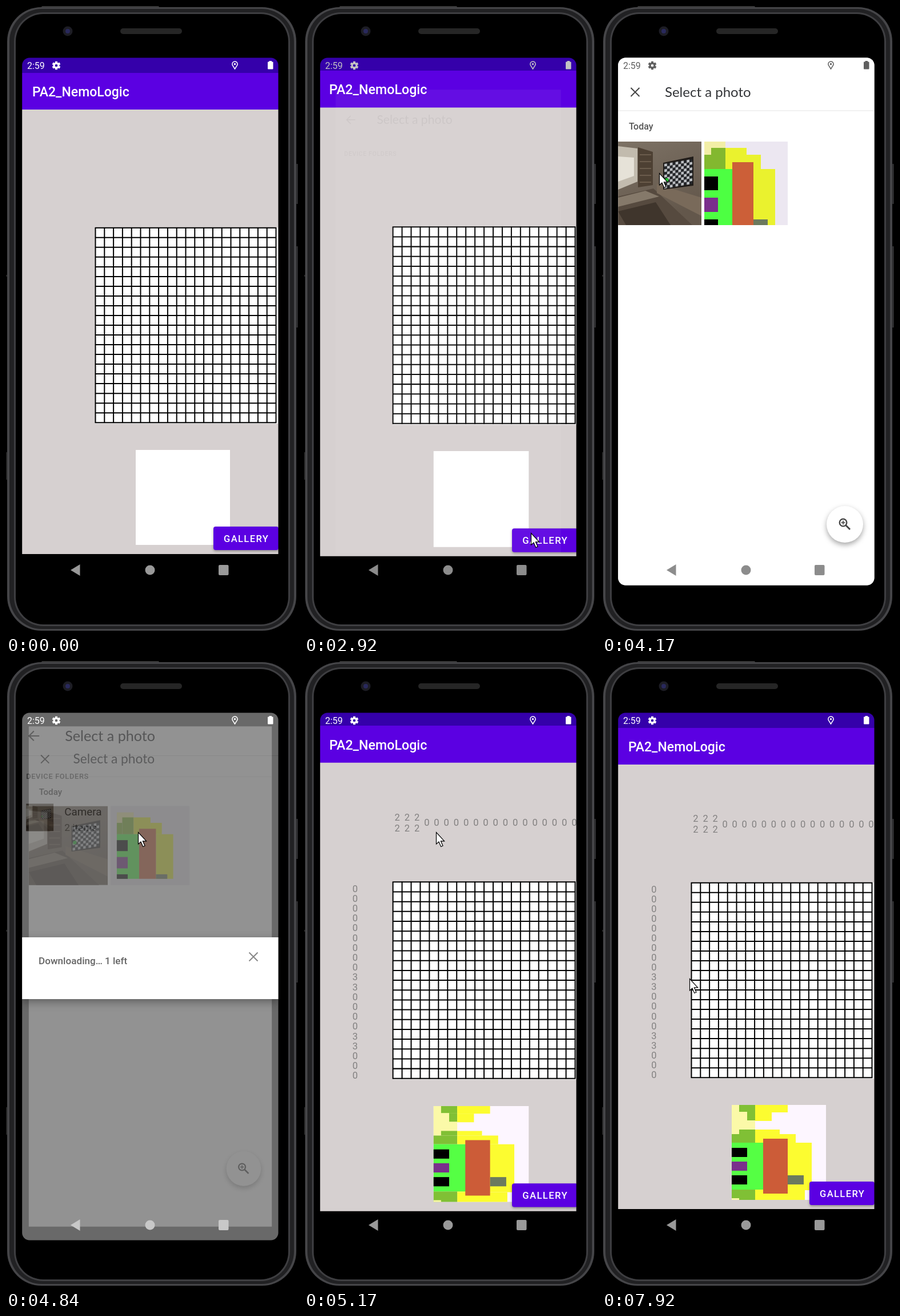
An HTML page with a canvas for the animation above (8000 ms loop, 511 by 1096 pixels).

```html
<!DOCTYPE html>
<html lang="en">
<head>
<meta charset="utf-8">
<title>Photo picker</title>
<style>
html, body { margin: 0; width: 100%; height: 100%; overflow: hidden; background: #000; }
canvas { display: block; }
</style>
</head>
<body>
<canvas id="stage" width="511" height="1096"></canvas>
<script>
const main = document.getElementById('stage').getContext('2d');
const buffer = main.canvas.cloneNode().getContext('2d');
let c = main;
const LOOP = 8000, FPS = 12, CX = 252.5, CY = 551.5;
const OPEN_LIST = 2864, OPEN_GRID = 3640, PICK = 4590, CLOSE_GRID = 4761, CLOSE_LIST = 5009;
const PALE = '#fbf9a8', OLIVE = '#80c035', YELLOW = '#fcfc30', GREEN = '#55ff44',
  ORANGE = '#cc5c38', PURPLE = '#7a2f8c', GREY = '#6c7a5e';
const CURSOR = [
  [980, 470, 101], [1250, 470, 101], [2000, 432, 924], [2240, 397, 921], [2920, 397, 921],
  [3480, 100, 292], [4230, 100, 292], [4480, 231, 299], [5900, 231, 299], [6480, 163, 527],
  [6740, 163, 527], [6900, 150, 591], [7080, 150, 591], [7400, 153, 555]
];

const clamp = v => Math.max(0, Math.min(1, v));
const ramp = (t, start, length) => clamp((t - start) / length);
const bez = (a, b, d, e, s) => {
  const r = 1 - s;
  return r * r * r * a + 3 * r * r * s * b + 3 * r * s * s * d + s * s * s * e;
};

// Two-part curve: quick start, very slow end.
function ease(x) {
  const [px, py] = x < 1 / 6
    ? [[0, .05, .1333, .1667], [0, 0, .06, .4]]
    : [[.1667, .2083, .25, 1], [.4, .82, 1, 1]];
  let lo = 0, hi = 1;
  for (let i = 0; i < 20; i++) {
    const mid = (lo + hi) / 2;
    if (bez(...px, mid) < x) lo = mid; else hi = mid;
  }
  return bez(...py, lo);
}
const move = (t, start) => ease(ramp(t, start, 400));

function rect(color, x, y, w, h, r = 0) {
  c.fillStyle = color;
  c.beginPath();
  c.roundRect(x, y, w, h, r);
  c.fill();
}
function disc(color, x, y, r) {
  c.fillStyle = color;
  c.beginPath();
  c.arc(x, y, r, 0, 7);
  c.fill();
}
function poly(color, ...p) {
  c.fillStyle = color;
  c.beginPath();
  for (let i = 0; i < p.length; i += 2) c.lineTo(p[i], p[i + 1]);
  c.closePath();
  c.fill();
}
function lines(color, width, ...paths) {
  c.strokeStyle = color;
  c.lineWidth = width;
  c.beginPath();
  for (const [x, y, ...rest] of paths) {
    c.moveTo(x, y);
    for (let i = 0; i < rest.length; i += 2) c.lineTo(rest[i], rest[i + 1]);
  }
  c.stroke();
}
// y is the middle of the capitals
function text(str, x, y, size, color, { weight = 400, family = 'Roboto', gap = 0, align = 'left' } = {}) {
  c.font = `${weight} ${size}px ${family}, sans-serif`;
  c.letterSpacing = gap + 'px';
  c.textAlign = align;
  c.fillStyle = color;
  c.fillText(str, x, y + size * .355);
}
function shadow(blur, dy, draw) {
  c.save();
  c.shadowColor = 'rgba(0,0,0,.35)';
  c.shadowBlur = blur;
  c.shadowOffsetY = dy;
  draw();
  c.restore();
}
function scaled(scale, x, y, draw) {
  c.save();
  c.translate(x, y);
  c.scale(scale, scale);
  c.translate(-x, -y);
  draw();
  c.restore();
}
// Paints a window aside, then blends it in as one picture
function layer(scale, alpha, draw) {
  if (alpha <= 0) return;
  c = buffer;
  c.clearRect(0, 0, 511, 1096);
  scaled(scale, CX, CY, draw);
  c = main;
  c.globalAlpha = alpha;
  c.drawImage(buffer.canvas, 0, 0);
  c.globalAlpha = 1;
}
const cross = (x, y, r, color) =>
  lines(color, 2, [x - r, y - r, x + r, y + r], [x + r, y - r, x - r, y + r]);

function phone() {
  rect('#000', 0, 0, 511, 1096);
  rect('#333', 62, 0, 206, 4, 2);
  for (const [y, h] of [[276, 70], [420, 142]]) rect('#29292b', 505, y, 7, h, 2);
  for (const [y, h] of [[470, 3], [780, 48]]) rect('#222', 0, y, 3, h);
  rect('#454548', 2, 2, 506, 1090, 60);
  rect('#212123', 6, 5, 498, 1084, 57);
  rect('#3e3e41', 14, 11, 483, 1073, 51);
  rect('#000', 17, 14, 477, 1067, 48);
  disc('#1d1d24', 108, 44, 8.5);
  disc('#29295c', 108, 44, 4);
  rect('#262626', 200, 39, 108, 10, 5);
}

function pixelArt() {
  rect('#fdf6ff', 227, 776, 165, 166);
  rect(PALE, 227, 776, 41, 51);
  rect(OLIVE, 240, 776, 28, 12);
  rect(OLIVE, 254, 788, 14, 15);
  rect(OLIVE, 240, 819, 28, 8);
  rect(OLIVE, 227, 827, 41, 15);
  rect(YELLOW, 268, 776, 57, 13);
  rect(YELLOW, 268, 789, 29, 15);
  rect(YELLOW, 268, 819, 43, 8);
  rect(YELLOW, 268, 827, 71, 15);
  rect(YELLOW, 268, 842, 99, 83);
  rect(YELLOW, 268, 925, 87, 17);
  rect(GREEN, 227, 842, 56, 82);
  rect(OLIVE, 227, 924, 41, 18);
  rect(PALE, 227, 939, 13, 3);
  rect(ORANGE, 282, 835, 43, 96);
  rect('#000', 227, 851, 27, 16);
  rect(PURPLE, 227, 875, 27, 16);
  rect('#000', 227, 899, 27, 16);
  rect(GREY, 325, 899, 28, 16);
}

function home(solved) {
  rect('#000', 28, 90, 449, 923);
  rect('#d6d0d0', 28, 90, 449, 868);
  rect('#5b00e2', 28, 117, 449, 64);
  rect('#3500aa', 28, 90, 449, 27);
  text('PA2_NemoLogic', 46, 150, 23, '#fff', { weight: 500 });

  rect('#fff', 156, 387, 320, 343);
  for (let i = 0; i <= 20; i++) {
    const x = 156.5 + i * 15.8, y = 387.8 + i * 17.02;
    lines('#000', 2, [x, 387, x, 729], [156, y, 473, y]);
  }

  if (solved) {
    const style = { align: 'center' }, ink = '#828080';
    for (let i = 0; i < 20; i++) {
      const x = 164 + i * 17.05;
      if (i < 3) {
        text('2', x, 275.5, 16.5, ink, style);
        text('2', x, 294.5, 16.5, ink, style);
      } else text('0', x, 285, 16.5, ink, style);
      const three = [9, 10, 15, 16].includes(i);
      text(three ? '3' : '0', 91, 399 + i * 17.05, 16.5, ink, style);
    }
    pixelArt();
  } else rect('#fff', 227, 776, 165, 166);

  shadow(4, 2, () => rect('#5b00e2', 363, 910, 114, 41, 4));
  text('GALLERY', 381, 931, 16.5, '#fff', { weight: 500, gap: 1.4 });
}

function header() {
  rect('#fff', 28, 90, 449, 923);
  lines('#e3e3e3', 1, [28, 183, 477, 183]);
  text('Select a photo', 110, 150, 24, '#333538', { family: 'Lato' });
}

// Living room in a 146 px square
function room(x, y, scale) {
  c.save();
  c.translate(x, y);
  c.scale(scale, scale);
  c.beginPath();
  c.rect(0, 0, 146, 146);
  c.clip();
  const wall = c.createLinearGradient(0, 0, 60, 146);
  wall.addColorStop(0, '#7d7265');
  wall.addColorStop(1, '#63574b');
  rect(wall, 0, 0, 146, 146);
  poly('#c2bbae', 0, 8, 34, 12, 34, 70, 0, 84);
  poly('#e6e2d8', 0, 26, 28, 28, 28, 60, 0, 70);
  poly('#4d4033', 35, 10, 61, 18, 61, 76, 35, 80);
  for (let i = 0; i < 5; i++) rect('#6b5c4c', 38, 22 + i * 12, 20, 2);
  poly('#564a3f', 0, 96, 62, 82, 130, 146, 0, 146);
  poly('#85796a', 0, 98, 48, 86, 72, 96, 0, 114);
  poly('#3f352c', 0, 122, 66, 106, 92, 146, 14, 146);
  poly('#796a5a', 68, 74, 146, 98, 146, 130, 68, 90);
  poly('#211d1a', 79, 37, 132, 26, 132, 77, 79, 84);
  c.transform(1, -.17, 0, 1, 81, 39);
  for (let i = 0; i < 10; i++)
    for (let j = 0; j < 9; j++)
      rect((i + j) % 2 ? '#24262a' : '#b9bcc0', i * 4.9, j * 4.8, 4.9, 4.8);
  rect('#1fc22c', 1, 26, 6, 6);
  c.restore();
}

function list(loaded) {
  header();
  lines('#555', 2, [67, 150, 50, 150], [58, 142, 50, 150, 58, 158]);
  text('DEVICE FOLDERS', 45, 217, 12.3, '#777', { weight: 500, gap: .6 });
  if (!loaded) return;
  room(45, 263, 46 / 146);
  text('Camera', 109, 276, 18, '#333');
  text('2 items', 109, 303, 16.5, '#777');
}

function artThumb() {
  const yellow = '#eaf22e';
  rect('#f2eea6', 179, 237, 37, 23);
  rect('#83b82f', 191, 248, 25, 37);
  rect('#83b82f', 179, 260, 12, 25);
  rect(yellow, 216, 248, 37, 37);
  rect(yellow, 253, 260, 25, 25);
  rect(yellow, 265, 285, 38, 98);
  rect('#4dff42', 179, 285, 49, 98);
  rect('#cc5f38', 228, 273, 37, 110);
  rect('#000', 179, 298, 24, 24);
  rect(PURPLE, 179, 335, 24, 25);
  rect('#000', 179, 373, 24, 10);
  rect(GREY, 265, 373, 25, 10);
}

function photos(picked) {
  header();
  cross(58, 150.5, 7.5, '#444');
  text('Today', 47, 210.5, 16, '#555', { weight: 500 });
  room(28, 237, 1);
  rect('#ece7f1', 179, 237, 146, 146);
  scaled(1 - .16 * picked, 252, 310, artThumb);
  shadow(10, 4, () => disc('#fff', 425, 906, 32));
  c.strokeStyle = '#444';
  c.lineWidth = 2.3;
  c.beginPath();
  c.arc(422, 903, 6.3, 0, 7);
  c.stroke();
  lines('#444', 2.8, [426.5, 907.5, 434, 915]);
  lines('#444', 1.6, [418.5, 903, 425.5, 903], [422, 899.5, 422, 906.5]);
}

function dialog() {
  shadow(14, 5, () => rect('#fff', 28, 483, 449, 108));
  text('Downloading… 1 left', 57, 524, 17.1, '#666', { weight: 500 });
  cross(433, 517, 7.5, '#888');
}

function status(dark) {
  const v = Math.round(255 - 160 * dark), color = `rgb(${v},${v},${v})`;
  text('2:59', 37, 104, 16, color);
  c.save();
  c.translate(88, 104);
  for (let i = 0; i < 6; i++) {
    c.rotate(Math.PI / 3);
    rect(color, -2, -7.3, 4, 5);
  }
  c.strokeStyle = color;
  c.lineWidth = 3;
  c.beginPath();
  c.arc(0, 0, 4, 0, 7);
  c.stroke();
  c.restore();
  c.strokeStyle = color;
  c.lineWidth = 1.5;
  c.beginPath();
  c.arc(400.5, 101.5, 4.6, 2.7, .44);
  c.lineTo(400.5, 110);
  c.closePath();
  c.stroke();
  disc(color, 400.5, 101.5, 1.7);
  rect(color, 458, 97.5, 9.5, 13, 1);
  rect(color, 460.5, 96, 4.5, 3);
}

function nav(color) {
  poly(color, 113, 986, 129.5, 976, 129.5, 996);
  disc(color, 252, 986, 8.5);
  rect(color, 372, 977, 17.5, 18, 2);
}

function cursor(t) {
  if (t < CURSOR[0][0]) return;
  let [, x, y] = CURSOR[0];
  for (let i = 1; i < CURSOR.length; i++) {
    const [t0, x0, y0] = CURSOR[i - 1], [t1, x1, y1] = CURSOR[i];
    if (t < t0) break;
    const k = ramp(t, t0, t1 - t0), e = k * k * (3 - 2 * k);
    x = x0 + (x1 - x0) * e;
    y = y0 + (y1 - y0) * e;
  }
  c.save();
  c.translate(x, y);
  poly('#fff', .5, .5, .5, 21, 5, 17, 8.7, 25.5, 12, 24, 8.4, 15.8, 14.6, 15.8);
  c.strokeStyle = '#000';
  c.lineWidth = 1.2;
  c.stroke();
  c.restore();
}

function screen(t) {
  const shade = ramp(t, CLOSE_GRID, 60);
  const enter = (start, draw) => layer(.85 + .15 * move(t, start), ramp(t, start + 50, 50), draw);
  const leave = (start, draw) => layer(1 - .1 * move(t, start), 1 - ramp(t, start + 36, 50), draw);
  const behind = (start, draw) => layer(1 + .05 * move(t, start), 1, draw);
  const back = (start, draw) => layer(1.1 - .1 * move(t, start), 1, draw);
  const folders = () => {
    list(t > OPEN_LIST + 100);
    rect(`rgba(0,0,0,${.59 * shade})`, 0, 0, 511, 1096);
  };
  const grid = () => photos(ramp(t, PICK, 120));

  if (t < OPEN_GRID) {
    behind(OPEN_LIST, () => home(false));
    enter(OPEN_LIST, folders);
  } else if (t < CLOSE_GRID) {
    behind(OPEN_GRID, folders);
    enter(OPEN_GRID, grid);
  } else if (t < CLOSE_LIST) {
    back(CLOSE_GRID, folders);
    leave(CLOSE_GRID, grid);
  } else {
    back(CLOSE_LIST, () => home(true));
    leave(CLOSE_LIST, folders);
  }
  layer(1, shade * (1 - ramp(t, CLOSE_LIST, 60)), dialog);
  status(ramp(t, OPEN_LIST, 140) * (1 - shade));
  nav(t > CLOSE_LIST || t < OPEN_LIST ? '#999' : t > CLOSE_GRID ? '#c8c8c8' : '#8c8c8c');
}

function draw(now) {
  const t = Math.floor((now % LOOP) * FPS / 1000 + .001) * 1000 / FPS;
  phone();
  c.save();
  c.beginPath();
  c.roundRect(28.2, 90.5, 448.3, 922, 13);
  c.clip();
  screen(t);
  c.restore();
  cursor(t);
}

let start;
function tick(now) {
  start ??= now;
  draw(now - start);
  requestAnimationFrame(tick);
}
draw(0);
requestAnimationFrame(tick);
</script>
</body>
</html>
```
